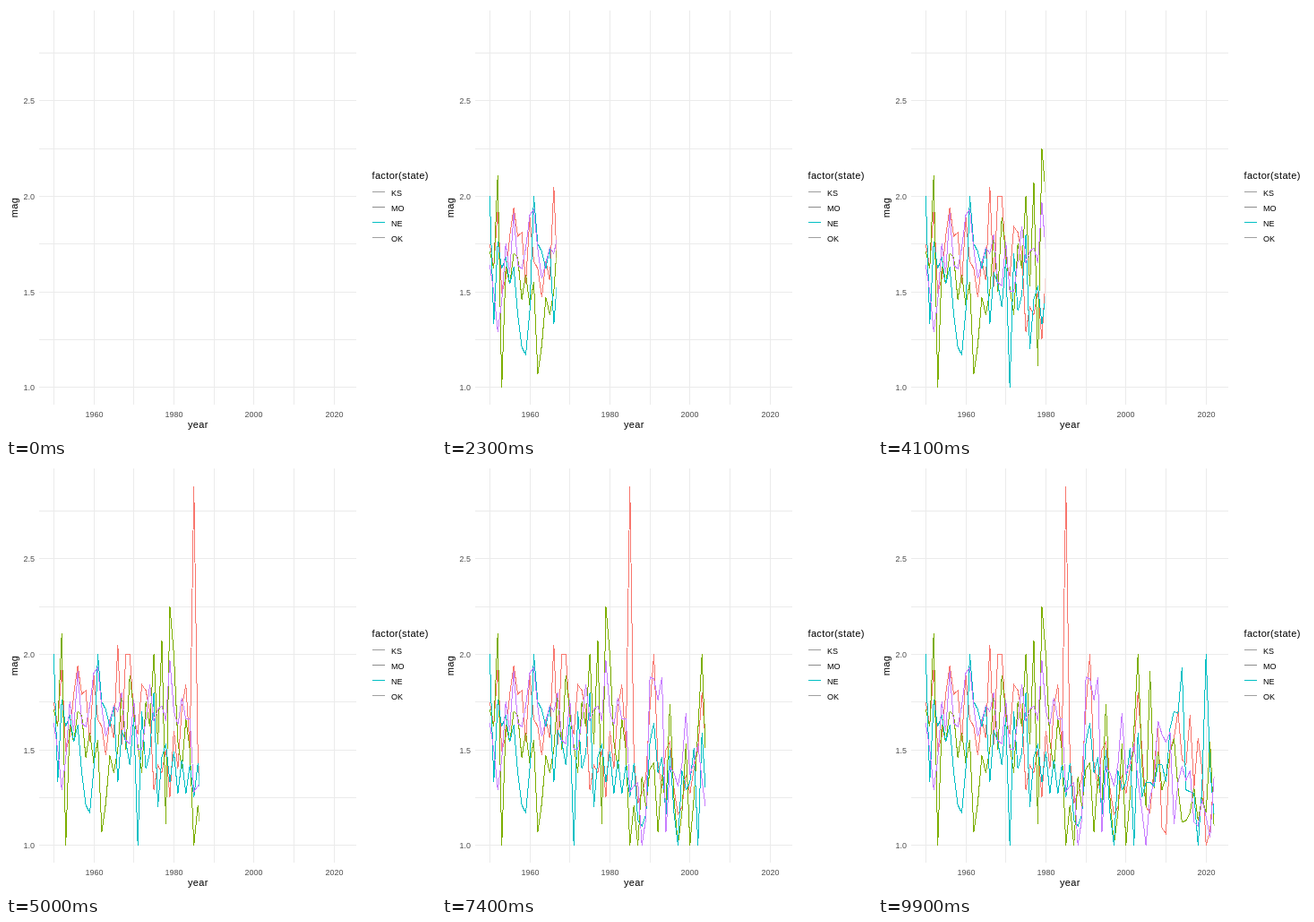
Write an HTML page that moves like this. It is 480x480 px and loops after 10000 ms.

```html
<!DOCTYPE html>
<html lang="en">
<head>
<meta charset="utf-8">
<title>Magnitude by year</title>
<style>
  html, body { margin: 0; width: 100%; height: 100%; overflow: hidden; background: #fff; }
  svg { position: absolute; left: 0; top: 0; width: 480px; height: 480px; }
  text { font-family: "Liberation Sans", Arial, sans-serif; font-size: 11px; }
  .title { letter-spacing: .35px; }
  .tick { font-size: 9px; fill: #4d4d4d; }
  .label { font-size: 9px; }
  path, polyline { fill: none; stroke-width: 1; shape-rendering: crispEdges; }
  #grid { stroke: #ebebeb; }
  #lines { animation: reveal 10s steps(100, jump-none) infinite; }
  @keyframes reveal {
    from { clip-path: inset(0 427.4px 0 0); }
    to { clip-path: inset(0 104.6px 0 0); }
  }
</style>
</head>
<body>
<svg id="frame" viewBox="0 0 480 480">
  <path id="grid"/>
  <text class="title" x="203" y="471">year</text>
  <text class="title" transform="translate(13 225) rotate(-90)" text-anchor="middle">mag</text>
  <text class="title" x="408.5" y="193">factor(state)</text>
</svg>
<svg id="lines" viewBox="0 0 480 480"></svg>
<script>
  // Yearly mean magnitude in hundredths, 1950 to 2022
  const series = [
    { name: "KS", color: "#f8766d", key: "#9d9d9d", mags: [
      175, 163, 193, 149, 157, 179, 194, 179, 181, 154,
      189, 166, 162, 147, 166, 156, 205, 153, 200, 200,
      167, 158, 184, 181, 170, 129, 142, 138, 150, 125,
      160, 140, 172, 184, 150, 287.5, 146, 122, 127, 135,
      172, 200, 143, 130, 150, 154, 130, 116, 120, 137,
      127, 140, 150, 180, 150, 120, 117, 140, 162, 109,
      106, 150, 156, 170, 145, 142, 168, 130, 156, 140,
      100, 108, 136] },
    { name: "MO", color: "#7cae00", key: "#8b8b8b", mags: [
      171, 162, 211, 100, 163, 154, 170, 168, 146, 159,
      143, 155, 107, 122, 147, 138, 150, 180, 150, 189,
      170, 152, 138, 175, 162, 200, 153, 207, 111, 225,
      200, 154, 140, 166, 150, 100, 121, 100, 136, 120,
      140, 143, 107, 137, 120, 174, 125, 100, 117, 153,
      100, 125, 160, 200, 142, 120, 191, 130, 149, 129,
      136, 148, 156, 130, 112, 113, 117, 130, 113, 125,
      117, 154, 110] },
    { name: "NE", color: "#00bfc4", key: "#00bfc4", mags: [
      200, 133, 176, 162, 168, 154, 163, 138, 121, 117,
      140, 200, 175, 171, 162, 173, 133, 160, 154, 142,
      167, 100, 170, 140, 148, 180, 120, 146, 153, 133,
      149, 127, 145, 127, 142, 125, 143, 113, 110, 116,
      154, 164, 138, 146, 116, 150, 117, 100, 139, 129,
      133, 151, 100, 159, 125, 133, 133, 131, 142, 142,
      133, 161, 170, 169, 193, 129, 128, 127, 100, 130,
      200, 140, 116] },
    { name: "OK", color: "#c77cff", key: "#a0a0a0", mags: [
      164, 150, 129, 145, 175, 160, 191, 164, 162, 173,
      190, 193, 172, 157, 165, 173, 170, 180, 155, 153,
      176, 150, 150, 166, 184, 165, 171, 173, 165, 197,
      170, 163, 177, 166, 166, 128, 131, 133, 100, 114,
      188, 187, 176, 188, 107, 141, 138, 131, 142, 169,
      137, 143, 153, 134, 118, 100, 125, 133, 165, 158,
      154, 159, 111, 133, 141, 134, 139, 112, 110, 124,
      115, 104, 136] }
  ];

  const xOf = year => 53.3 + (year - 1950) * 4.47;
  const yOf = mag => 425.6 - (mag - 1) * 213.4;
  const snap = v => Math.floor(v) + .5;
  const frame = document.getElementById("frame");
  const lines = document.getElementById("lines");

  function add(parent, tag, attrs, text = "") {
    const el = document.createElementNS("http://www.w3.org/2000/svg", tag);
    for (const name in attrs) el.setAttribute(name, attrs[name]);
    el.textContent = text;
    parent.append(el);
  }

  let grid = "";
  for (let year = 1950; year <= 2020; year += 10) {
    const x = snap(xOf(year));
    grid += `M${x} 5V445`;
    if (year % 20 === 0) {
      add(frame, "text", { class: "tick", x, y: 459, "text-anchor": "middle" }, year);
    }
  }
  for (let mag = 1; mag <= 2.75; mag += .25) {
    const y = snap(yOf(mag) + .3);
    grid += `M37 ${y}H391`;
    if (mag % .5 === 0) {
      add(frame, "text", { class: "tick", x: 32, y: y + 3.5, "text-anchor": "end" }, mag.toFixed(1));
    }
  }
  document.getElementById("grid").setAttribute("d", grid);

  series.forEach(({ name, color, key, mags }, i) => {
    const y = Math.floor(208 + i * 17.28);
    add(frame, "path", { d: `M409 ${y - .5}h14`, stroke: key });
    add(frame, "text", { class: "label", x: 430, y: y + 4 }, name);
    const points = mags.map((m, n) => `${xOf(1950 + n).toFixed(2)},${yOf(m / 100).toFixed(2)}`);
    add(lines, "polyline", { points: points.join(" "), stroke: color });
  });
</script>
</body>
</html>
```
